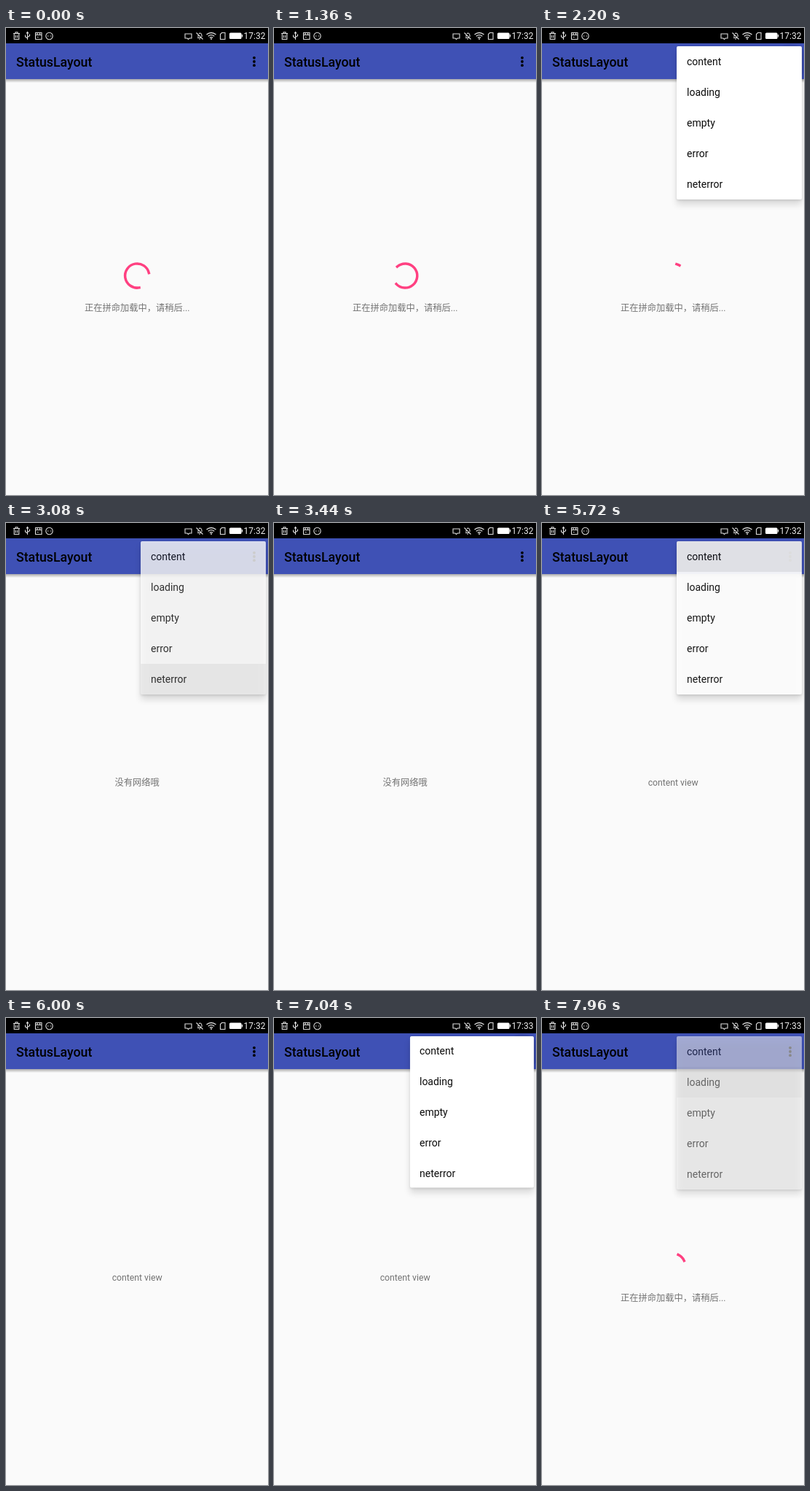
Animation of 360x640 px, one loop 8 s. Source, as an HTML page:

```html
<!DOCTYPE html>
<html lang="zh-CN">
<head>
<meta charset="utf-8">
<title>StatusLayout</title>
<style>
  html, body { margin: 0; width: 100%; height: 100%; overflow: hidden; background: #fafafa; }
  svg { display: block; width: 360px; height: 640px; }
  text { font-family: Roboto, "Noto Sans CJK SC", "Noto Sans CJK", sans-serif; }
  .title { font-size: 17.7px; font-weight: 500; }
  .view { font-size: 12.25px; fill: #737373; text-anchor: middle; }
  .item { font-size: 14px; fill: #0c0c0c; }
  .icon { fill: none; stroke: #dcdcdc; stroke-width: 1.1; }
</style>
</head>
<body>
<svg viewBox="0 0 360 640">
  <defs>
    <filter id="soft" x="-30%" y="-30%" width="160%" height="160%"><feGaussianBlur stdDeviation="5"/></filter>
    <filter id="tight" x="-30%" y="-30%" width="160%" height="160%"><feGaussianBlur stdDeviation="1.6"/></filter>
    <linearGradient id="drop" x2="0" y2="1">
      <stop stop-opacity=".32"/>
      <stop offset="1" stop-opacity="0"/>
    </linearGradient>
    <clipPath id="clip"><rect class="panel" rx="2"/></clipPath>
  </defs>

  <rect width="360" height="640" fill="#fafafa"/>
  <rect y="70" width="360" height="5" fill="url(#drop)"/>
  <rect y="21" width="360" height="49" fill="#3f51b5"/>
  <rect width="360" height="21" fill="#000"/>

  <g class="icon">
    <path d="M10 7.5h9M13 7.200v-1.400h3v1.400M11.200 8v7.500h6.600V8M13.300 10v3.500M15.700 10v3.500"/>
    <path d="M29.500 16V6M28 7.500l1.500-2 1.500 2M29.500 14l-3-2v-2.500M29.500 12.500l3-1.800V8.500"/>
    <path d="M40.500 6.500h8.500v9h-8.500zM40.500 9.500h8.500M43 6.500v3M46.500 6.500v3M43 12.500h1.500"/>
    <circle cx="59.500" cy="11" r="4.700"/>
    <path d="M57 11h1.400M60.800 11h1.400"/>
    <path d="M246 8h9v6h-3l-1.500 1.500L249 14h-3z"/>
    <path d="M261.500 6.500l9 9M263 13.500h6M264 12.500V10M265 7.500q3.500-1.500 4 2.500v2M265.300 15.300h1.600"/>
    <path d="M275.500 9q6.500-5 13 0M277.700 11.300q4.300-3.300 8.600 0M279.900 13.400q2.100-1.500 4.200 0" stroke-width="1.400"/>
    <path d="M296.500 6.500h4.500v9h-6.500v-7z"/>
    <rect x="307.500" y="7" width="15.500" height="7.500" rx="1" fill="#fff" stroke="#fff"/>
    <path d="M324.500 9v3.500" stroke="#fff"/>
  </g>
  <circle cx="282" cy="15" r="1" fill="#dcdcdc"/>
  <text id="clock" x="326.500" y="15.200" font-size="12" fill="#eee"></text>

  <text class="title" x="14" y="53">StatusLayout</text>
  <circle id="touch" cx="341" cy="46" r="24" fill="#000"/>
  <circle cx="341" cy="40.800" r="1.900"/><circle cx="341" cy="46" r="1.900"/><circle cx="341" cy="51.200" r="1.900"/>

  <g id="loading">
    <circle id="ring" r="16.600" fill="none" stroke="#ff4081" stroke-width="3.500" stroke-linecap="square" pathLength="360"/>
    <text class="view" x="180.200" y="388">正在拼命加载中，请稍后...</text>
  </g>
  <text class="view" id="neterror" x="180.200" y="360">没有网络哦</text>
  <text class="view" id="content" x="180.200" y="360">content view</text>

  <g id="shade">
    <rect id="near" rx="2" opacity=".1" filter="url(#tight)"/>
    <rect id="far" rx="2" opacity=".13" filter="url(#soft)"/>
  </g>
  <g id="menu">
    <rect class="panel" rx="2" fill="#fff"/>
    <g clip-path="url(#clip)">
      <g id="list"><rect id="press" x="185" width="172" height="42"/></g>
    </g>
  </g>
</svg>
<script>
const LOOP = 8000, STEP = 40, CYCLE = 1333;
const OPEN_DELAY = 150, OPEN_TIME = 250, SWAP_DELAY = 180, FADE_TIME = 300;
const ITEMS = ['content', 'loading', 'empty', 'error', 'neterror'];
const VISITS = [
  { tap: 1780, select: 2840, item: 4 },
  { tap: 4320, select: 5520, item: 0 },
  { tap: 6680, select: 7640, item: 1 }
];

const $ = id => document.getElementById(id);
const clamp = v => Math.max(0, Math.min(1, v));
const set = (el, attrs) => { for (const k in attrs) el.setAttribute(k, attrs[k]); };
const panels = document.querySelectorAll('.panel');

ITEMS.forEach((name, i) => {
  const label = document.createElementNS('http://www.w3.org/2000/svg', 'text');
  set(label, { class: 'item', x: 199, y: 51 + 42 * i });
  label.textContent = name;
  $('list').append(label);
});

// Bezier from (0,0) to (x3,1) whose control points have y = 0 and y = 1
function ease(x, x1, x2, x3) {
  if (x <= 0) return 0;
  if (x >= x3) return 1;
  let lo = 0, hi = 1;
  for (let i = 0; i < 24; i++) {
    const s = (lo + hi) / 2, r = 1 - s;
    if (3 * x1 * s * r * r + 3 * x2 * s * s * r + x3 * s ** 3 < x) lo = s; else hi = s;
  }
  return lo * lo * (3 - 2 * lo);
}

function drawRing(turns) {
  const p = turns % 1;
  const trim = x => 270 * ease(x, .2, .1, .5);
  const start = trim(p - .5), length = trim(p) - start;
  const angle = start + 90 * p + 144 * turns - 90;
  set($('ring'), {
    transform: `translate(180.200 339.500) rotate(${angle})`,
    'stroke-dasharray': `${Math.max(length, .1)} 400`
  });
}

function drawMenu(t) {
  const visit = VISITS.find(v => t >= v.tap && t < v.select + SWAP_DELAY + FADE_TIME);
  const since = visit ? t - visit.tap - OPEN_DELAY : -1;
  const shown = since >= 0;
  $('menu').style.display = $('shade').style.display = shown ? '' : 'none';
  $('touch').style.opacity = visit ? .14 * clamp((t - visit.tap) / 150) * clamp(1 - since / 400) : 0;
  if (!shown) return;

  const k = ease(since / OPEN_TIME, 0, .2, 1);
  const x = 322 - 137 * k, width = 357 - x, height = 42 + 168 * k;
  panels.forEach(el => set(el, { x, y: 25, width, height }));
  set($('near'), { x, y: 26.5, width, height });
  set($('far'), { x, y: 32, width, height });
  set($('list'), { transform: `translate(${69 * (1 - k)} ${-84 * (1 - k)})` });

  const leave = 1 - clamp((t - visit.select - SWAP_DELAY) / FADE_TIME);
  const enter = clamp((since + STEP) / 100);
  $('menu').style.opacity = enter * leave;
  $('shade').style.opacity = enter * Math.min(1, 1.6 * leave);
  set($('press'), { y: 25 + 42 * visit.item, opacity: .08 * clamp((t - visit.select + STEP) / 150) * leave });
}

function draw(t) {
  const swaps = VISITS.map(v => v.select + SWAP_DELAY);
  const view = t < swaps[0] || t >= swaps[2] ? 'loading' : t < swaps[1] ? 'neterror' : 'content';
  for (const id of ['loading', 'neterror', 'content']) $(id).style.display = id === view ? '' : 'none';
  drawRing(t < swaps[2] ? 3.42 + t / CYCLE : (t - swaps[2]) / CYCLE);
  $('clock').textContent = t < 6680 ? '17:32' : '17:33';
  drawMenu(t);
}

const begin = performance.now();
function tick() {
  const t = (performance.now() - begin) % LOOP;
  draw(Math.floor(t / STEP) * STEP);
  requestAnimationFrame(tick);
}
tick();
</script>
</body>
</html>
```
